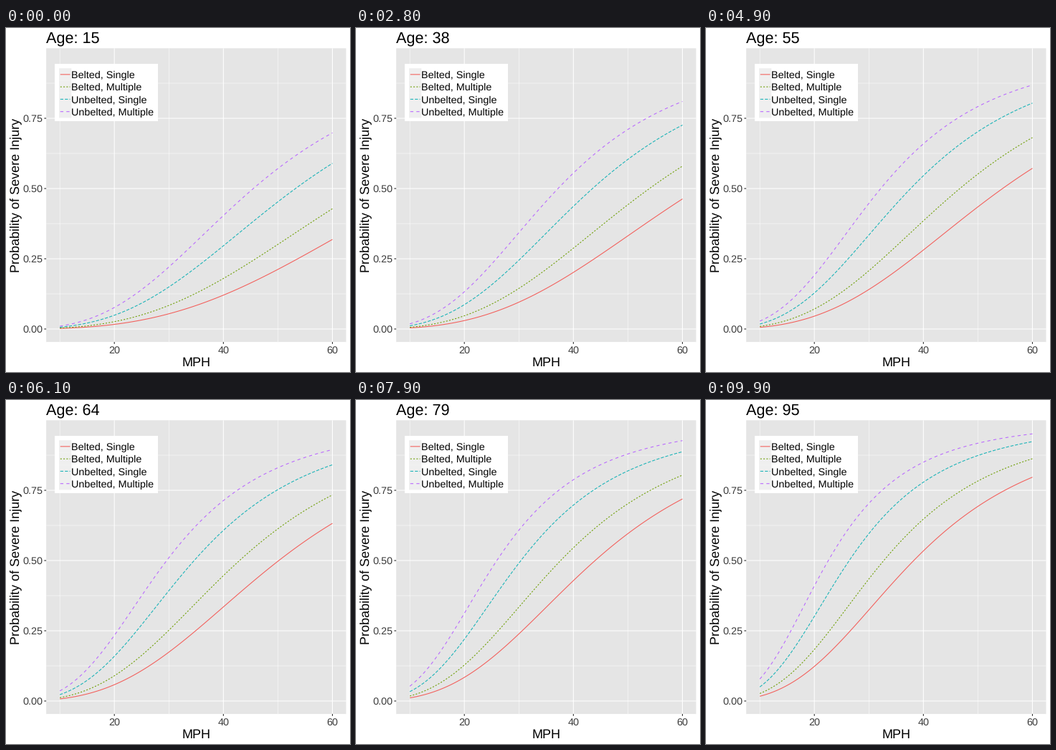
A matplotlib script that plays this animation: 480x480 px, repeating every 10 s.

```python
import numpy as np
import matplotlib.pyplot as plt
from matplotlib.animation import FuncAnimation
from matplotlib.patches import Rectangle

SIZE, FRAMES, INTERVAL = 480, 100, 100
LEFT, RIGHT, TOP, BOTTOM = 56.1, 474.5, 28.3, 438.1
TEXT, TICK, TICK_TEXT = "black", "#262626", "#3c3c3c"
LINE_W = 1.07

# label, colour, dash pattern, log-odds offset
GROUPS = [
    ("Belted, Single", "#f35e5a", "-", 0.0),
    ("Belted, Multiple", "#6f9f06", (0, (2, 2)), 0.470),
    ("Unbelted, Single", "#17b3b7", (0, (4, 2)), 1.122),
    ("Unbelted, Multiple", "#b967ff", (0, (4, 4)), 1.598),
]

# Each whole age falls on a whole frame; frames in between are interpolated
AGES = np.arange(15, 96)
AGE_FRAMES = np.rint(np.linspace(0, FRAMES - 1, len(AGES)))

plt.rcParams.update({
    "font.family": "Liberation Sans",
    "text.hinting": "none",
    "path.snap": False,
    "lines.dash_capstyle": "butt",
    "lines.solid_capstyle": "butt",
})


def px(mph):
    return LEFT + (mph - 7.5) * (RIGHT - LEFT) / 55


def py(prob):
    return 420 - prob * 392


def injury_prob(mph, age, offset):
    logit = -0.759 + 3.03 * np.log(mph / 60) + 0.02656 * (age - 15) + offset
    return 1 / (1 + np.exp(-logit))


fig = plt.figure(figsize=(SIZE / 72, SIZE / 72), dpi=72, facecolor="white")
ax = fig.add_axes([0, 0, 1, 1])
ax.set(xlim=(0, SIZE), ylim=(SIZE, 0))
ax.axis("off")


def box(x0, y0, x1, y1, color, z):
    ax.add_patch(Rectangle((x0, y0), x1 - x0, y1 - y0, fc=color, lw=0, zorder=z))


def line(xs, ys, color, width=LINE_W, z=2, style="-"):
    return ax.plot(xs, ys, color=color, lw=width, ls=style, zorder=z)[0]


def label(x, y, s, size, color=TEXT, **kw):
    return ax.text(x, y, s, fontsize=size, color=color, va="baseline", zorder=6, **kw)


# Panel and grid
box(LEFT, TOP, RIGHT, BOTTOM, "#e5e5e5", 0)
for mph in (10, 30, 50):
    line([px(mph)] * 2, [TOP, BOTTOM], "white", LINE_W / 2, 1)
for prob in (0.125, 0.375, 0.625, 0.875):
    line([LEFT, RIGHT], [py(prob)] * 2, "white", LINE_W / 2, 1)

for mph in (20, 40, 60):
    x = px(mph)
    line([x, x], [TOP, BOTTOM], "white")
    line([x, x], [BOTTOM, BOTTOM + 2.75], TICK)
    label(x, 453.6, str(mph), 14.4, TICK_TEXT, ha="center")
for prob in (0, 0.25, 0.5, 0.75):
    y = py(prob)
    line([LEFT, RIGHT], [y, y], "white")
    line([LEFT - 2.75, LEFT], [y, y], TICK)
    label(LEFT - 4.95, y + 5.2, f"{prob:.2f}", 14.4, TICK_TEXT, ha="right")

label((LEFT + RIGHT) / 2, 472, "MPH", 18, ha="center")
ax.text(18, (TOP + BOTTOM) / 2, "Probability of Severe Injury", fontsize=18,
        color=TEXT, rotation=90, rotation_mode="anchor", ha="center", va="baseline")
title = label(LEFT, 20, "", 21.6)

# Legend
KEY = 17.28
box(68, 50, 212, 130, "white", 4)
for i, (name, color, style, _) in enumerate(GROUPS):
    x, y = 74, 56.2 + i * KEY
    mid = y + KEY / 2
    box(x, y, x + KEY, y + KEY, "#efefef", 4.5)
    line([x + 0.1 * KEY, x + 0.9 * KEY], [mid, mid], color, z=5, style=style)
    label(x + KEY, mid + 5.2, name, 14.4)

mph = np.linspace(10, 60, 101)
curves = [line(px(mph), 0 * mph, color, z=3, style=style)
          for _, color, style, _ in GROUPS]


def update(frame):
    age = np.interp(frame, AGE_FRAMES, AGES)
    title.set_text(f"Age: {int(age + 0.5)}")
    for curve, (*_, offset) in zip(curves, GROUPS):
        curve.set_ydata(py(injury_prob(mph, age, offset)))
    return [title, *curves]


anim = FuncAnimation(fig, update, frames=FRAMES, interval=INTERVAL,
                     repeat=True, repeat_delay=0, blit=False)
plt.show()
```
